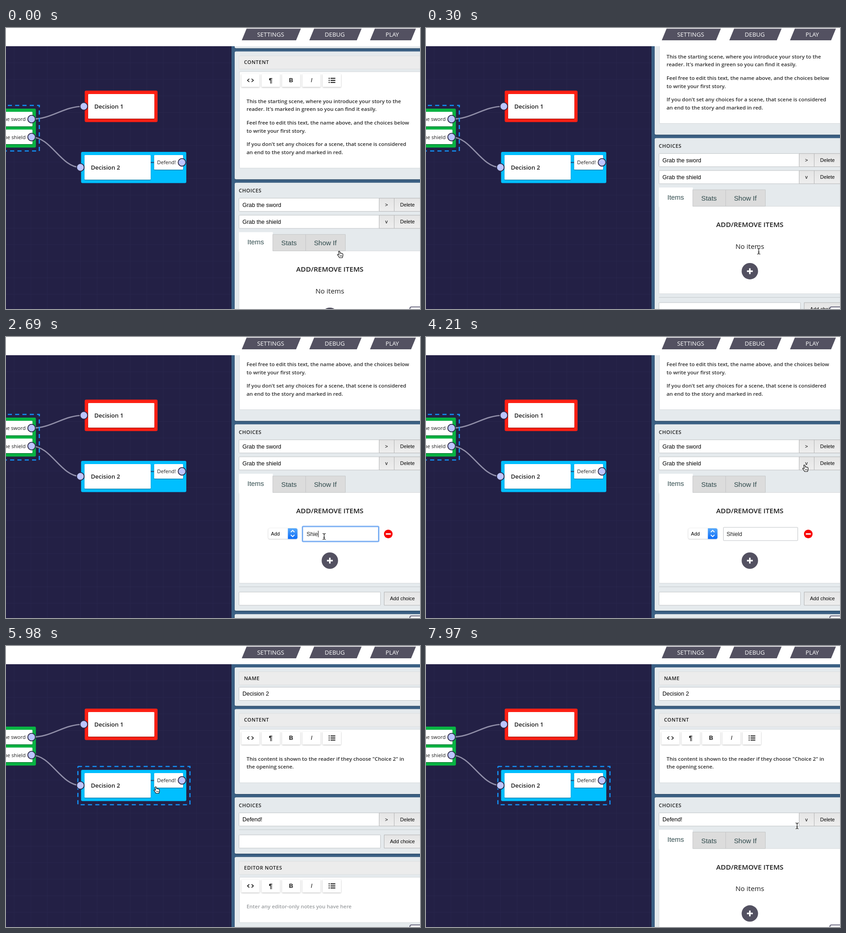
An HTML page with a canvas for the animation above (8000 ms loop, 907x617 px).

```html
<!DOCTYPE html>
<html lang="en">
<head>
<meta charset="utf-8">
<title>Story editor</title>
<style>
  html, body { margin: 0; width: 100%; height: 100%; overflow: hidden; background: #fff; }
  canvas { display: block; }
</style>
</head>
<body>
<canvas id="stage" width="907" height="617"></canvas>
<script>
const ctx = document.getElementById('stage').getContext('2d');
const LOOP = 8000, WIDTH = 907, HEIGHT = 617;
const SANS = '"Open Sans", "Noto Sans", sans-serif';
const UI = '"Liberation Sans", Arial, sans-serif';
const SLATE = '#535161', AMBER = '#e09f00', NAVY = '#232045', BLUE = '#3b6084', PANEL = '#e5eaed';

// ---------- helpers ----------
function rect(x1, y1, x2, y2, fill, stroke, radius = 0, lineWidth = 1) {
  ctx.beginPath();
  ctx.roundRect(x1, y1, x2 - x1, y2 - y1, radius);
  if (fill) { ctx.fillStyle = fill; ctx.fill(); }
  if (stroke) { ctx.strokeStyle = stroke; ctx.lineWidth = lineWidth; ctx.stroke(); }
}
function shadowed(blur, offset, color, draw) {
  ctx.save();
  ctx.shadowBlur = blur; ctx.shadowOffsetY = offset; ctx.shadowColor = color;
  draw();
  ctx.restore();
}
function shade(top, bottom, from, to) {
  const gradient = ctx.createLinearGradient(0, top, 0, bottom);
  gradient.addColorStop(0, from);
  gradient.addColorStop(1, to);
  return gradient;
}
function circle(x, y, r, fill, stroke, lineWidth = 1.8) {
  ctx.beginPath();
  ctx.arc(x, y, r, 0, 7);
  ctx.fillStyle = fill; ctx.fill();
  if (stroke) { ctx.strokeStyle = stroke; ctx.lineWidth = lineWidth; ctx.stroke(); }
}
function poly(points, fill, stroke, lineWidth = 1, close = true) {
  ctx.beginPath();
  points.forEach(([x, y]) => ctx.lineTo(x, y));
  if (close) ctx.closePath();
  if (fill) { ctx.fillStyle = fill; ctx.fill(); }
  if (stroke) { ctx.strokeStyle = stroke; ctx.lineWidth = lineWidth; ctx.stroke(); }
}
// y is the middle of the capital letters
function text(str, x, y, size, { font = SANS, weight = 400, color = '#1c1c1c', align = 'left', spacing = 0 } = {}) {
  ctx.font = `${weight} ${size}px ${font}`;
  ctx.fillStyle = color;
  ctx.textAlign = align;
  ctx.letterSpacing = spacing + 'px';
  ctx.fillText(str, x, y + size * 0.358);
}

// ---------- timeline ----------
const SCROLL_STOPS = [60, 120, 180, 240, 300, 390, 490, 590];
function scrollAt(t) {
  const stop = SCROLL_STOPS.filter(s => s <= t).pop();
  return stop ? 148 * (1 - (1 - (stop - 30) / 560) ** 1.65) : 0;
}
const TYPING = [2280, 2400, 2590, 2690, 2810, 2980];
const typedAt = t => 'Shield'.slice(0, TYPING.filter(s => s <= t).length);

// time, hotspot x, y, pointer shape from that time on
const POINTER = [
  [0, 730, 490, 'hand'], [60, 730, 490, 'arrow'], [220, 729, 490, 'beam'], [420, 729, 490, 'arrow'],
  [720, 729, 490, 'arrow'], [800, 724, 490, 'hand'], [910, 718, 491, 'hand'],
  [1370, 718, 491, 'hand'], [1500, 712, 476, 'arrow'], [1620, 702, 450, 'beam'], [1740, 697, 438, 'beam'],
  [3130, 697, 438, 'beam'], [3280, 716, 414, 'arrow'], [3560, 784, 345, 'arrow'],
  [3830, 784, 345, 'arrow'], [4100, 820, 296, 'hand'], [4210, 829, 281, 'hand'],
  [5000, 829, 281, 'hand'], [5070, 770, 290, 'arrow'], [5300, 420, 331, 'arrow'], [5390, 335, 323, 'hand'],
  [5450, 335, 323, 'hand'], [5560, 328, 309, 'hand'],
  [6140, 328, 309, 'hand'], [6330, 396, 330, 'arrow'], [6780, 800, 394, 'arrow'], [6870, 818, 395, 'arrow'],
  [6960, 819, 386, 'hand'], [7080, 824, 386, 'hand'],
  [7880, 824, 386, 'hand'], [7970, 813, 395, 'beam'], [8000, 813, 395, 'beam']
];
function pointerAt(t) {
  const i = POINTER.findLastIndex(k => k[0] <= t);
  const [t0, x0, y0, shape] = POINTER[i];
  const [t1, x1, y1] = POINTER[i + 1];
  const p = (t - t0) / (t1 - t0);
  return { x: x0 + (x1 - x0) * p, y: y0 + (y1 - y0) * p, shape };
}

const START = {
  scroll: 87, name: 'Start', choices: ['Grab the sword', 'Grab the shield'],
  content: [
    ['This the starting scene, where you introduce your story to the', "reader. It's marked in green so you can find it easily."],
    ['Feel free to edit this text, the name above, and the choices below', 'to write your first story.'],
    ["If you don't set any choices for a scene, that scene is considered", 'an end to the story and marked in red.']
  ]
};
const DECISION = {
  scroll: 0, name: 'Decision 2', choices: ['Defend!'],
  content: [['This content is shown to the reader if they choose "Choice 2" in', 'the opening scene.']]
};

// ---------- story graph ----------
function card(x1, y1, x2, y2) {
  shadowed(2, 1, 'rgba(0,0,0,.45)', () => rect(x1, y1, x2, y2, '#fff', null, 1.5));
}
function link(x1, y1, x2, y2) {
  const bend = (x2 - x1) * 0.4;
  ctx.beginPath();
  ctx.moveTo(x1, y1);
  ctx.bezierCurveTo(x1 + bend, y1, x2 - bend, y2, x2, y2);
  ctx.strokeStyle = '#918fa9'; ctx.lineWidth = 2.6; ctx.stroke();
}
function selection(x1, y1, x2, y2) {
  ctx.setLineDash([9, 7]);
  rect(x1, y1, x2, y2, null, '#1291f7', 0, 2.6);
  ctx.setLineDash([]);
}
function drawGraph(t) {
  rect(0, 40, 494, HEIGHT, NAVY);
  for (let x = 17.5; x < 494; x += 36.3) rect(x, 40, x + 1, HEIGHT, '#29264c');
  for (let y = 76; y < HEIGHT; y += 36.3) rect(0, y, 494, y + 1, '#29264c');

  rect(-20, 177, 65.5, 262.5, '#08b443', null, 3);
  card(-20, 184, 58, 216);
  card(-20, 223, 58, 255);
  text('Grab the sword', 43, 200, 11.2, { align: 'right' });
  text('Grab the shield', 43, 239.5, 11.2, { align: 'right' });

  rect(172.5, 137.5, 332, 206.5, '#ff2014', null, 3);
  card(180, 145, 325, 199);
  text('Decision 1', 193.5, 172, 13, { weight: 600 });

  rect(164.5, 272, 395, 340.5, '#00bfff', null, 3);
  rect(317, 294, 325, 296.5, '#14618f');
  card(172, 279, 317, 333);
  card(324.5, 279, 388, 311);
  text('Decision 2', 186, 306.5, 13, { weight: 600 });
  text('Defend!', 331, 295, 11.2);

  link(56, 200, 170.5, 172);
  link(56, 239.5, 163, 306);
  if (t < 5800) selection(-108, 170, 73, 270);
  else selection(157.5, 264.5, 403, 348.5);
  for (const [x, y] of [[56, 200], [56, 239.5], [170.5, 172], [163, 306], [385.5, 295]])
    circle(x, y, 8.3, '#bcc5ff', '#2a2844');
}

// ---------- side panel ----------
function panel(top, bottom) {
  shadowed(2, 1, 'rgba(0,0,0,.3)', () => rect(501, top, WIDTH + 10, bottom + .6, PANEL, null, 3));
}
function heading(str, x, y) {
  text(str, x, y, 11, { weight: 600, spacing: 0.5 });
}
function header(str, top) {
  rect(510.5, top + 9.5, WIDTH + 10, top + 38.5, '#ececec', '#dcdedf');
  heading(str, 521.5, top + 24);
}
function field(str, x2, y) {
  rect(510.5, y - 14.5, x2, y + 14.5, '#fff', '#bfc3c6', 1);
  text(str, 518, y, 12.45, { font: UI, color: '#000' });
}
function button(str, x1, x2, y, labelX, pressed) {
  const fill = pressed ? '#cdcdcd' : shade(y - 14, y + 14, '#e5e5e5', '#eeeeee');
  rect(x1 + .5, y - 14.5, x2 - .5, y + 14.5, fill, '#b2b3b4');
  text(str, labelX, y, 11, { font: UI, color: '#000', align: 'center' });
}
function toolbar(y) {
  for (let i = 0; i < 5; i++) {
    const x = 515.5 + 44.6 * i;
    shadowed(3, 1, 'rgba(0,0,0,.28)', () => rect(x, y - 14, x + 40, y + 14.5, '#fff', null, 1));
  }
  ctx.lineJoin = 'miter';
  for (const s of [-1, 1])
    poly([[535.5 + s * 2.5, y - 3.5], [535.5 + s * 6.5, y], [535.5 + s * 2.5, y + 3.5]], null, '#111', 1.6, false);
  const label = { font: UI, align: 'center', color: '#111' };
  text('¶', 580, y, 14, { ...label, weight: 700 });
  text('B', 624.5, y, 12.5, { ...label, weight: 700 });
  text('I', 669.5, y, 12.5, { ...label, weight: 'italic 400' });
  for (const dy of [-4.5, 0, 4.5]) {
    circle(708, y + dy, 1.2, '#111');
    rect(711, y + dy - 1, 721.5, y + dy + 1, '#111');
  }
}
function editor(title, top, paragraphs, style) {
  header(title, top);
  const lineCount = paragraphs.flat().length;
  let y = top + 109;
  const bottom = y + (lineCount - 1) * 17.8 + (paragraphs.length - 1) * 11.6 + 35;
  rect(511.5, top + 44.5, WIDTH + 10, bottom, '#fff', '#d3d7da');
  toolbar(top + 63.5);
  for (const lines of paragraphs) {
    for (const line of lines) {
      text(line, 527, y, 11.4, style);
      y += 17.8;
    }
    y += 11.6;
  }
}
function tab(str, x1, x2, top, bottom, labelY, active) {
  rect(x1 + .5, top, x2 + .5, bottom, active ? '#fff' : '#dcdcdc', active ? null : '#c4c6c7');
  text(str, (x1 + x2) / 2, labelY, 14.9, { font: UI, color: '#2f4a4c', align: 'center' });
}
function itemRow(y, t) {
  shadowed(2, .5, 'rgba(0,0,0,.3)', () => rect(574.5, y - 12.5, 638.5, y + 11, '#fff', null, 4));
  text('Add', 580.5, y, 10.8, { font: UI, color: '#000' });
  rect(617.5, y - 12.5, 638.5, y + 11, shade(y - 12, y + 11, '#57a9fb', '#0a6bf7'), null, [0, 4, 4, 0]);
  for (const s of [-1, 1])
    poly([[624, y - 1 + s * 3], [628, y - 1 + s * 7], [632, y - 1 + s * 3]], null, '#fff', 1.8, false);

  const focused = t >= 1740 && t < 3620;
  if (focused) rect(649.5, y - 16.5, 816.5, y + 16.5, '#fff', '#7db0f3', 2, 3);
  else rect(651.5, y - 14.5, 814.5, y + 14.5, '#fff', '#bfc3c6', 1);
  const typed = typedAt(t);
  text(typed, 658.5, y, 12.3, { font: UI, color: '#222' });
  const caretX = 659 + ctx.measureText(typed).width;
  if (focused) rect(caretX, y - 7, caretX + 1, y + 7, '#000');

  circle(837.5, y, 9.5, '#f80000');
  rect(832, y - 1.5, 843, y + 1.5, '#fff');
}
function choiceDetails(y, t, hasItem) {
  const extra = hasItem ? 7 : 0;
  rect(510.5, y + 64, WIDTH + 10, y + 256 + extra, '#fff', '#d6d9db');
  tab('Items', 510, 584, y + 22.7, y + 66, y + 44, true);
  tab('Stats', 584, 656, y + 27.7, y + 64, y + 46.5);
  tab('Show If', 656, 743, y + 27.7, y + 64, y + 46.5);
  text('ADD/REMOVE ITEMS', 709.5, y + 104.5, 15.1, { weight: 600, align: 'center' });
  if (hasItem) itemRow(y + 155, t);
  else text('No items', 709.5, y + 152, 15, { align: 'center' });

  const plusY = y + 206.5 + extra;
  circle(709.5, plusY, 18, t >= 800 && t < 1480 ? AMBER : SLATE);
  rect(703, plusY - 1.7, 716, plusY + 1.7, '#fff', null, 1);
  rect(707.8, plusY - 6.5, 711.2, plusY + 6.5, '#fff', null, 1);
}
function drawSide(t) {
  rect(494, 40, WIDTH, HEIGHT, BLUE);
  const onStart = t < 5860;
  const scene = onStart ? START : DECISION;
  const open = t < 4680 || t >= 7500;
  const hasItem = onStart && t >= 1150;
  const pressed = (t >= 4440 && t < 4680) || (t >= 7320 && t < 7500);

  let y = 47 - scene.scroll - (onStart ? scrollAt(t) : 0);
  panel(y, y + 84);
  header('NAME', y);
  field(scene.name, WIDTH + 10, y + 58);

  y += 91.5;
  const contentEnd = y + 168 + (scene.content.flat().length - 1) * 17.8 + (scene.content.length - 1) * 11.6;
  panel(y, contentEnd);
  editor('CONTENT', y, scene.content, { weight: 600, color: '#2c2c2c' });

  y = contentEnd + 8;
  const last = y + 48.5 + (scene.choices.length - 1) * 37.3;
  const details = open ? 241.5 + (hasItem ? 7 : 0) : 0;
  panel(y, last + 74.5 + details);
  heading('CHOICES', 510, y + 17.5);
  scene.choices.forEach((choice, i) => {
    const rowY = y + 48.5 + i * 37.3;
    const isLast = i === scene.choices.length - 1;
    field(choice, 817.5, rowY);
    button(isLast && open ? 'v' : '>', 817, 851, rowY, 833.5, isLast && pressed);
    button('Delete', 850, WIDTH + 10, rowY, 879.5);
  });
  if (open) choiceDetails(last, t, hasItem);
  y = last + details;
  rect(510, y + 22, WIDTH, y + 23, '#c6cbce');
  field('', 820.5, y + 48.5);
  button('Add choice', 828, WIDTH + 10, y + 48.5, 868.5);

  y += 82.5;
  panel(y, y + 222);
  editor('EDITOR NOTES', y, [['Enter any editor-only notes you have here']], { weight: 600, color: '#9a9da0' });
  text('This box is for adding comments, new ideas, or general notes for', 509.5, y + 168, 13);
  text('this scene. These notes are not visible to the user.', 509.5, y + 188.5, 13);

  y += 230;
  panel(y, y + 200);
  header('SETTINGS', y);
  rect(885, 612.5, WIDTH + 10, HEIGHT + 10, '#fff', '#3d3b58', 3, 1.5);
}

// ---------- top bar and pointer ----------
function drawTopBar() {
  rect(0, 0, WIDTH, 40, '#fff');
  for (const [str, x1, x2] of [['SETTINGS', 516.5, 646], ['DEBUG', 664.5, 779], ['PLAY', 797.5, 898]]) {
    poly([[x1 + 10.5, 1.5], [x2, 1.5], [x2 - 10.5, 27], [x1, 27]], SLATE);
    text(str, (x1 + x2) / 2 - 1.5, 14.5, 13, { color: '#fff', align: 'center' });
  }
}
function drawPointer({ x, y, shape }) {
  ctx.save();
  ctx.translate(x, y);
  ctx.lineJoin = 'round';
  if (shape === 'arrow') {
    poly([[0, 0], [0, 13], [3, 10.3], [5.2, 15.2], [7.4, 14.2], [5.3, 9.5], [9.3, 9.3]], '#000', '#fff', 1);
  } else if (shape === 'beam') {
    ctx.lineCap = 'round';
    for (const [color, width] of [['#fff', 3], ['#111', 1.2]]) {
      for (const s of [-1, 1])
        poly([[-3, s * 6.5], [-1.2, s * 6.2], [0, s * 5], [1.2, s * 6.2], [3, s * 6.5]], null, color, width, false);
      poly([[0, -5], [0, 5]], null, color, width, false);
      poly([[-1.5, 2], [1.5, 2]], null, color, width, false);
    }
  } else {
    poly([[-1.5, .6], [0, 0], [1.3, .8], [2, 4.6], [4, 4.2], [5, 5.2], [7, 5.2], [8.2, 6.6],
      [8.2, 10], [6.8, 14.5], [.5, 14.5], [-1.5, 11.2], [-4, 8], [-3.2, 6.8], [-.2, 8]], '#fff', '#111', 1.2);
    for (const lineX of [1.8, 3.7, 5.6]) poly([[lineX, 9], [lineX, 12]], null, '#111', .8, false);
  }
  ctx.restore();
}

function render(now) {
  const t = now % LOOP;
  drawGraph(t);
  drawSide(t);
  drawTopBar();
  drawPointer(pointerAt(t));
  requestAnimationFrame(() => render(performance.now()));
}
render(0);
</script>
</body>
</html>
```
